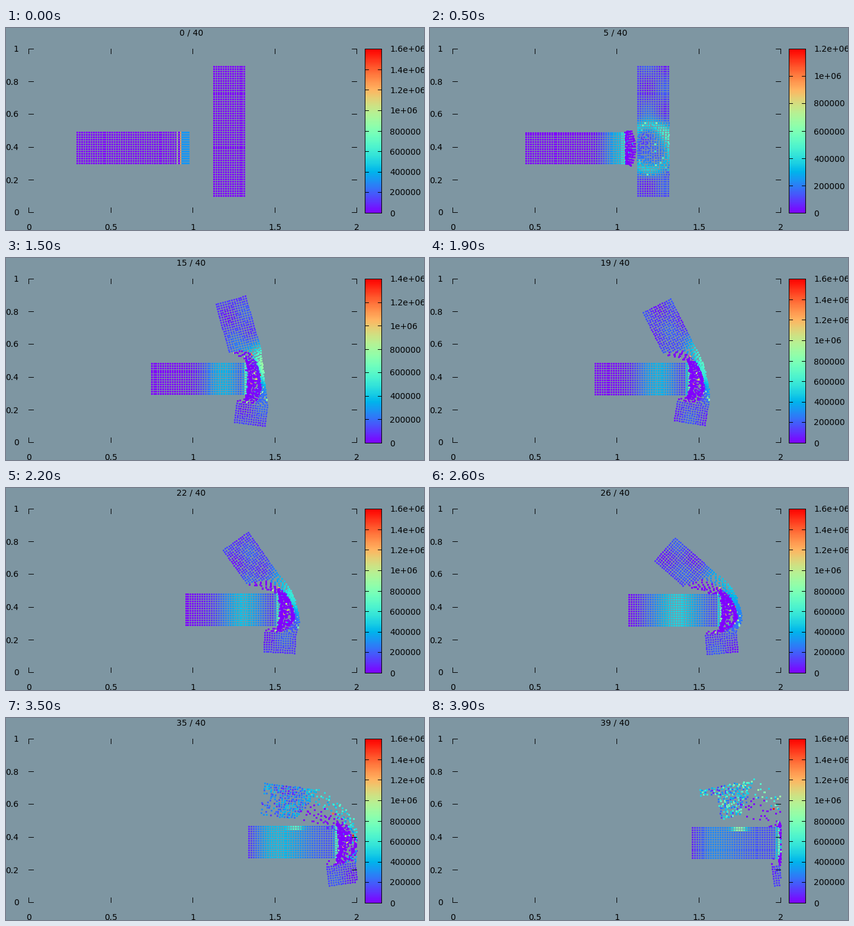
A matplotlib script that plays this animation: 706 by 341 pixels, repeating every 4 s.

```python
import numpy as np
import matplotlib.pyplot as plt
from matplotlib.animation import FuncAnimation
from matplotlib.collections import LineCollection

W, H, DPI = 706, 341, 64
FRAMES = 40
NARROW, LONG = 14, 56              # particles across and along each bar
PITCH = 277 * 0.2 / NARROW
WIDTH, LENGTH = (NARROW - 1) * PITCH, (LONG - 1) * PITCH
LEFT, RIGHT, TOP, BOTTOM = 38.5, 592.5, 35.5, 311.5
BAR_L, BAR_R, BAR_B = 606.5, 634.5, 312.5

cmap = plt.get_cmap("rainbow")
rng = np.random.default_rng(7)

plt.rcParams["font.family"] = "DejaVu Sans"
plt.rcParams["font.size"] = 14 * 72 / DPI
fig = plt.figure(figsize=(W / DPI, H / DPI), dpi=DPI, facecolor="#7e96a2")
ax = fig.add_axes([0, 0, 1, 1])
ax.axis("off")


def ramp(n, start, end):
    return np.clip((n - start) / (end - start), 0, 1)


def smooth(n, start, end):
    x = ramp(n, start, end)
    return x * x * (3 - 2 * x)


def hump(x, mid, width):
    return np.exp(-((x - mid) / width) ** 2)


# index of every particle along and across its bar
along, across = (g.ravel() for g in np.meshgrid(
    np.arange(LONG), np.arange(NARROW), indexing="ij"))
speck, tone, life = rng.random((3, LONG * NARROW))
shake = rng.normal(size=(2, LONG * NARROW))


def rod_face(n):
    """Front of the rod: free flight, then slowed by the plate."""
    return min(332 + 8.4 * n, 308 + 7.7 * n)


def rod(n):
    """Positions and stress of the moving rod."""
    i, j = along, across
    hit = ramp(n, 2, 10)
    back = 120.5 + 8.43 * n - 0.004 * n ** 2
    crush = 43 - 0.14 * n          # column where the crushed nose begins
    s = np.clip((i - crush) / (LONG - 1 - crush), 0, 1)
    nose = s > 0.04
    v = j / (NARROW - 1) * 2 - 1

    start = back + PITCH * crush
    reach = s - 0.05 * np.sin(np.pi * s)
    x = back + PITCH * np.minimum(i, crush)
    x += reach * (rod_face(n) - start) - 17 * hit * s * v ** 2
    y = 202.6 + 0.0056 * n ** 2 + v * WIDTH / 2 * (1 + 0.32 * hit * s)
    x, y = x + hit * nose * shake[0], y + 1.3 * hit * nose * shake[1]

    late = ramp(n, 31, 39)
    value = ramp(n, 0, 5) * (0.25 - 0.17 * late) * hump(i, 44 - 0.9 * n, 6 + 0.2 * n)
    value += 0.1 * ramp(n, 20, 30) * ramp(i, 0, 8)
    value += 0.35 * hit * hump(i, crush - 0.5, 1.2)
    value += 0.4 * late * hump(i, 20, 3) * (j < 2)
    value[nose] = 0
    hot = nose & (speck < 0.05)
    value[hot] = hit * (0.3 + 0.5 * tone[hot])

    # the first shock, already inside the rod at the start
    shock = 0.62 * (i == 43) + 0.78 * (i == 47) + 0.2 * (i > 47)
    return x, y, value + ramp(n, 4, 0) * shock


def plate(n):
    """Positions and stress of the plate: two stiff arms and a soft middle."""
    t, w = along / (LONG - 1), across / (NARROW - 1)
    m = max(n - 5, 0)              # time since the plate began to bend
    hit, late = ramp(n, 2, 10), ramp(n, 32, 39)

    def arm(px, py, angle, side, dist):
        c, d = np.cos(np.radians(angle)), np.sin(np.radians(angle))
        return np.array([px + WIDTH * side * c - dist * d,
                         py + WIDTH * side * d + dist * c])

    def upper(side, dist):
        return arm(351.5 + 3.5 * (m / 10) ** 2.85,
                   65.5 + 112 * smooth(m, 0, 38) ** 1.2,
                   -0.505 * m ** 1.5, side, dist)

    def lower(side, dist):
        return arm(351.5 + 9.6 * (np.hypot(m, 12) - 12),
                   65.5 + LENGTH - 9 * hump(n, 19, 6),
                   10 * hump(n, 18, 5) - 8 * smooth(n, 18, 30), side, dist)

    # share of the length where the upper arm ends and the lower one begins
    t1 = 0.42 + (0.02 - 0.17 * smooth(n, 5, 32)) * (1 - w)
    t2 = 0.84
    s = np.clip((t - t1) / (t2 - t1), 0, 1)
    mid = (s > 0) & (s < 1)
    side = w ** (1 + 2 * hit * s * (1 - s))

    def bulge(edge, gap):
        ends = upper(edge, LENGTH * t1[edge * (NARROW - 1)]) + lower(
            edge, LENGTH * (t2 - 1))
        return max(0, rod_face(n) + gap - ends[0] / 2)

    a = upper(side, LENGTH * np.minimum(t, t1))
    b = lower(side, LENGTH * (np.maximum(t, t2) - 1))
    x, y = a + (b - a) * s
    push = bulge(0, 3) * (1 - side) + bulge(1, 12) * side
    x = x + push * (1 - np.abs(2 * s - 1) ** 3)
    jitter = np.where(mid, 0.5 * hit + 0.02 * n * (1 - w) + 3 * late,
                      1.2 * late * (t < t2))
    x, y = x + jitter * shake[0], y + jitter * shake[1]

    # slow waves in the arms, ring of the first blow, stretched outer side
    wave = 1 + 0.6 * np.sin(0.3 * along + 0.4 * n) * np.cos(0.4 * across - 0.3 * n)
    value = 0.08 * ramp(n, 0, 4) * wave + 0.4 * late * tone * (t < t2)
    value += 0.2 * hump(n, 5, 2.5) * hump(np.hypot(x - 370, y - 202), 38, 11)
    value += (hit * (0.2 + 0.25 * hump(n, 14, 8))
              * hump(t, 0.55, 0.17) * (0.2 + 0.8 * w))
    value[mid & (w < 0.6)] *= ramp(n, 16, 8)
    value += 0.8 * hump(n, 10, 3) * hump(t, 0.6, 0.1) * (w < 0.05)
    hot = mid & (speck < 0.06)
    value[hot] += hit * (0.2 + 0.5 * tone[hot])

    # the tip and the torn middle break away late
    tip = (t < 0.125) & (w < 0.8)
    gone = (tip & (n > 33 + 5 * life)) | (mid & (n > 32 + 16 * life))
    return x[~gone], y[~gone], value[~gone]


def draw_lines(segments):
    lines = LineCollection(segments, colors="black", linewidths=72 / DPI,
                           capstyle="projecting", snap=False, zorder=4)
    return ax.add_collection(lines)


def label(x, y, text, ha):
    return ax.text(x, y, text, ha=ha, va="baseline", color="black")


def pixel(y):
    return np.floor(y) + 0.5


# axis ticks and labels
ticks = []
for k in range(5):
    x = pixel(LEFT + (RIGHT - LEFT) * k / 4)
    ticks += [[(x, TOP), (x, TOP + 8)], [(x, BOTTOM), (x, BOTTOM - 8)]]
    label(x, 341, f"{k / 2:g}", "center")
for k in range(6):
    y = pixel(BOTTOM - (BOTTOM - TOP) * k / 5)
    ticks += [[(LEFT, y), (LEFT + 8, y)], [(RIGHT, y), (RIGHT - 8, y)]]
    label(21.5, y + 5, f"{k / 5:g}", "right")
draw_lines(ticks)

# colour bar
ax.imshow(np.linspace(1, 0, 256)[:, None], cmap=cmap, aspect="auto",
          extent=(BAR_L, BAR_R, BAR_B, TOP), interpolation="nearest", zorder=1)
ax.set_xlim(0, W)
ax.set_ylim(H, 0)
draw_lines([[(BAR_L, TOP), (BAR_R, TOP), (BAR_R, BAR_B),
             (BAR_L, BAR_B), (BAR_L, TOP)]])
bar_ticks = draw_lines([])
bar_labels = [label(648, 0, "", "left") for _ in range(9)]

title = label(313, 12, "", "center")
dots = ax.scatter([], [], s=(3 * 72 / DPI) ** 2, marker="s", linewidths=0,
                  zorder=2)


def update(n):
    title.set_text(f"{n} / {FRAMES}")

    # the scale follows the peak stress in steps of 200000
    steps = round(np.interp(n, [0, 5, 10, 19, 26, 31, 36],
                            [8, 6, 6, 8, 8, 7, 8]))
    marks = []
    for k, text in enumerate(bar_labels):
        text.set_visible(k <= steps)
        y = pixel(BAR_B - (BAR_B - TOP) * k / steps)
        text.set_y(y + 5)
        text.set_text(f"{k * 200000:g}")
        if k <= steps:
            marks += [[(BAR_L, y), (BAR_L + 6, y)], [(BAR_R, y), (BAR_R - 6, y)]]
    bar_ticks.set_segments(marks)

    x, y, value = (np.concatenate(p) for p in zip(plate(n), rod(n)))
    seen = x <= RIGHT + 0.5
    dots.set_offsets(pixel(np.column_stack([x, y])[seen]))
    dots.set_facecolor(cmap(np.clip(value[seen], 0, 1)))
    return [dots, title]


anim = FuncAnimation(fig, update, frames=FRAMES, interval=100, repeat=True,
                     repeat_delay=0, init_func=lambda: update(0))
plt.show()
```
